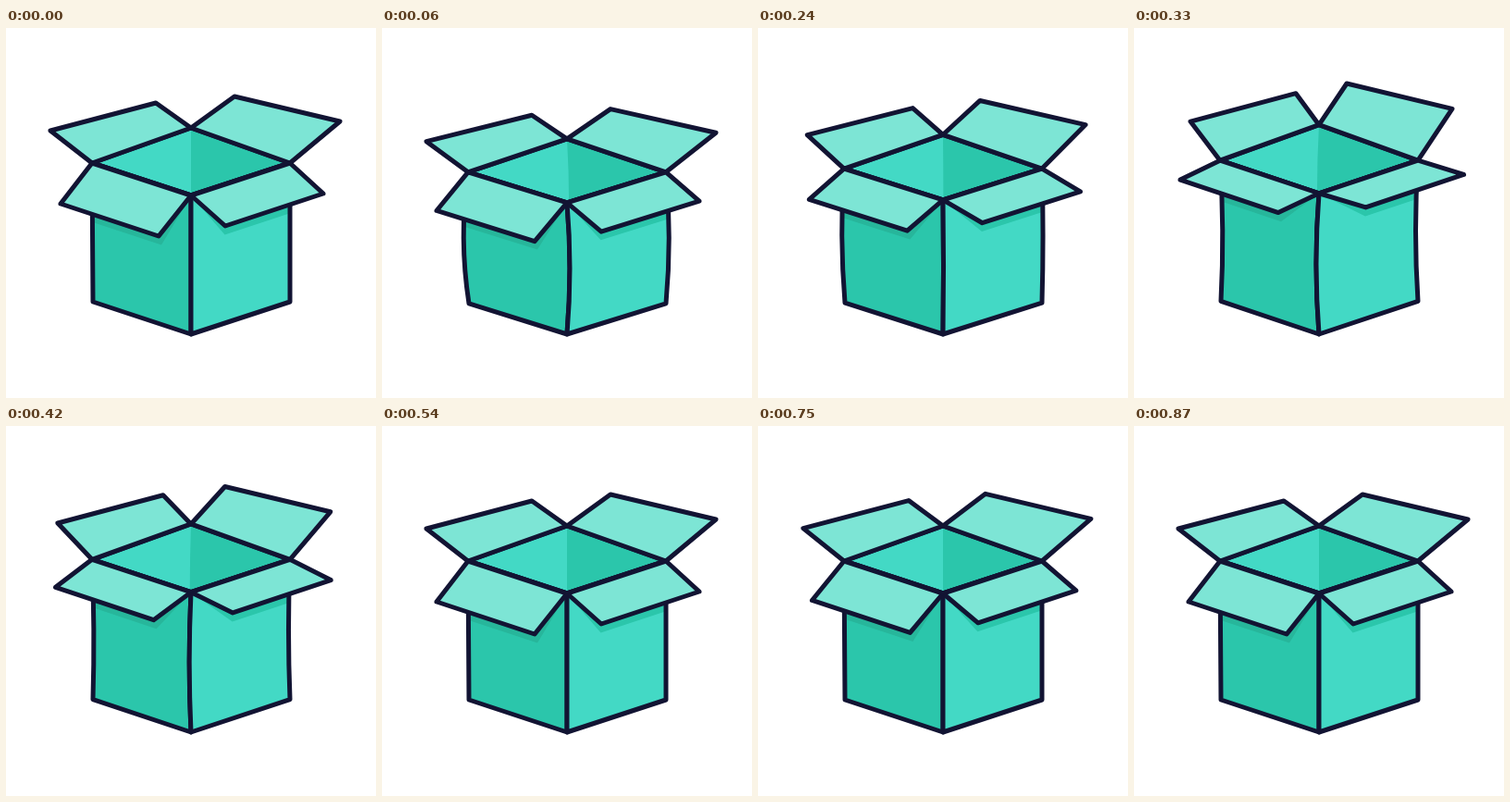
These frames come from a looping animation (400 by 400 pixels, 2.9 s). An HTML page with a canvas:

```html
<!DOCTYPE html>
<html lang="en">
<head>
<meta charset="utf-8">
<title>Open box</title>
<style>
  html, body { margin: 0; width: 100%; height: 100%; overflow: hidden; background: #fff; }
  canvas { display: block; width: 400px; height: 400px; }
</style>
</head>
<body>
<canvas id="stage" width="400" height="400"></canvas>
<script>
const ctx = document.getElementById('stage').getContext('2d');
const LOOP = 2900, STEP = 30, GROUND = 331;
const INK = '#121433', PALE = '#7de5d5', LIGHT = '#43d9c5', MID = '#2bc6ab', DARK = '#27b69b';

// Keyframes as [time, value], eased between neighbours.
const STRETCH = [[0, 1], [120, .894], [330, 1.015], [540, 1]];
const LIFT = [[170, 0], [330, 1], [540, 0], [705, .08], [870, 0]];
const bulgeKeys = (out, back) => [[0, 0], [120, out], [330, back], [540, 0]];
const BULGE_LEFT = bulgeKeys(-21, 4.5);
const BULGE_RIGHT = bulgeKeys(13, -5);
const BULGE_FRONT = bulgeKeys(12, -6);

const RIM = { left: [93, 146], back: [200, 108], right: [307, 146], front: [200, 181] };
const BASE = { left: [94, 296], front: [200, 331], right: [307, 296] };

// Each flap: its hinge, two free corners, and how far they travel when lifted.
const FLAPS = {
  backLeft: { hinge: [RIM.left, RIM.back], tips: [[162, 81], [48, 111]], move: [13, -6.5] },
  backRight: { hinge: [RIM.right, RIM.back], tips: [[247, 74], [361, 101]], move: [-17, -10] },
  frontLeft: { hinge: [RIM.left, RIM.front], tips: [[165, 225], [59, 190]], move: [-9, -23.5] },
  frontRight: { hinge: [RIM.right, RIM.front], tips: [[237, 214], [343, 179]], move: [13.5, -18] }
};

function track(keys, t) {
  if (t <= keys[0][0]) return keys[0][1];
  for (let i = 1; i < keys.length; i++) {
    const [t0, a] = keys[i - 1], [t1, b] = keys[i];
    if (t <= t1) {
      const u = (t - t0) / (t1 - t0);
      return a + (b - a) * u * u * (3 - 2 * u);
    }
  }
  return keys[keys.length - 1][1];
}

function polygon(points) {
  const path = new Path2D();
  points.forEach(p => path.lineTo(...p));
  path.closePath();
  return path;
}

function bendTo(path, from, to, bulge) {
  path.quadraticCurveTo((from[0] + to[0]) / 2 + bulge, (from[1] + to[1]) / 2, ...to);
}

function paint(path, color) {
  ctx.fillStyle = color;
  ctx.fill(path);
  ctx.stroke(path);
}

function draw(t) {
  const stretch = track(STRETCH, t), lift = track(LIFT, t);
  const frontBulge = track(BULGE_FRONT, t);
  const place = ([x, y]) => [x, GROUND - (GROUND - y) * stretch];
  const [left, back, right, front] = [RIM.left, RIM.back, RIM.right, RIM.front].map(place);
  const baseFront = place(BASE.front);

  function flapPoints({ hinge, tips, move }, dx = 0, dy = 0) {
    const moved = tips.map(([x, y]) => [x + move[0] * lift + dx, y + move[1] * lift + dy]);
    return [...hinge, ...moved].map(place);
  }

  const drawFlap = flap => paint(polygon(flapPoints(flap)), PALE);

  function drawInside() {
    const rim = polygon([left, back, right, front]);
    const shade = new Path2D();
    const floor = place([200, 258]);
    shade.moveTo(...back);
    bendTo(shade, back, floor, frontBulge * .7);
    shade.lineTo(400, floor[1]);
    shade.lineTo(400, back[1]);
    ctx.fillStyle = LIGHT;
    ctx.fill(rim);
    ctx.save();
    ctx.clip(rim);
    ctx.fillStyle = MID;
    ctx.fill(shade);
    ctx.restore();
    ctx.stroke(rim);
  }

  function drawWall(top, base, bulge, flap, shift, color, shadow) {
    const wall = new Path2D();
    wall.moveTo(...top);
    bendTo(wall, top, base, bulge);
    wall.lineTo(...baseFront);
    bendTo(wall, baseFront, front, frontBulge);
    wall.closePath();
    ctx.fillStyle = color;
    ctx.fill(wall);
    ctx.save();
    ctx.clip(wall);
    ctx.fillStyle = shadow;
    // The shadow hangs from the rim's front corner.
    const [a, , c, d] = flapPoints(flap, shift, 9.5);
    ctx.fill(polygon([a, front, c, d]));
    ctx.restore();
    ctx.stroke(wall);
  }

  ctx.fillStyle = '#fff';
  ctx.fillRect(0, 0, 400, 400);
  ctx.strokeStyle = INK;
  ctx.lineWidth = 5;
  ctx.lineJoin = 'round';

  drawInside();
  drawFlap(FLAPS.backLeft);
  drawFlap(FLAPS.backRight);
  drawWall(left, place(BASE.left), track(BULGE_LEFT, t), FLAPS.frontLeft, 3, MID, DARK);
  drawWall(right, place(BASE.right), track(BULGE_RIGHT, t), FLAPS.frontRight, -.5, LIGHT, MID);
  drawFlap(FLAPS.frontLeft);
  drawFlap(FLAPS.frontRight);
}

const start = performance.now();
function tick() {
  const t = (performance.now() - start) % LOOP;
  draw(Math.floor(t / STEP) * STEP);
  requestAnimationFrame(tick);
}
tick();
</script>
</body>
</html>
```
